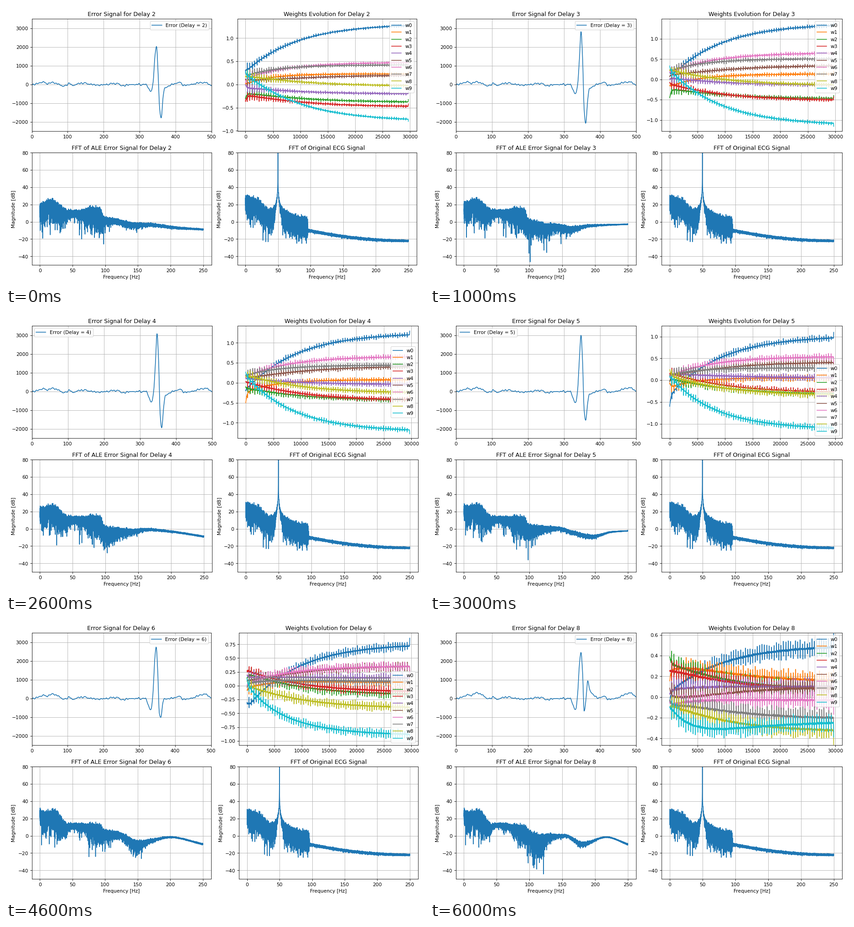
These frames come from a looping animation (917 px wide and 611 px high, 7000 ms). A matplotlib script:

```python
import matplotlib.pyplot as plt
import numpy as np
from matplotlib.animation import FuncAnimation

W, H = 917, 611
fig = plt.figure(figsize=(12, 8), dpi=76.417)

LENGTH = 29700
SAMPLES = np.arange(501)
STEPS = np.arange(0, LENGTH + 1, 10)
FREQS = np.linspace(0, 250, 15001)

rng = np.random.default_rng(4)
NOISE = (rng.normal(size=FREQS.size) + 1j * rng.normal(size=FREQS.size)) / 2 ** 0.5
BEATS = 347 + 431 * np.arange(68) + rng.uniform(-25, 25, 68)
WIGGLE = sum(rng.uniform(8, 18) * np.sin(2 * np.pi * SAMPLES / p + rng.uniform(0, 6))
             for p in np.geomspace(7, 24, 6))

# Rows belong to delays 2, 4, 6 and 8; other delays follow a cubic between them.
QRS_X = [318, 333, 338, 343, 347.5, 351.5, 356, 360.5, 366, 371, 392]
QRS_Y = [[-350, 150, 1500, 2050, 700, -1300, -1780, -600, -200],
         [-550, 0, 1500, 3130, 1800, -1200, -1940, -800, -230],
         [-590, 200, 2000, 2770, 1500, -800, -1000, -220, -30],
         [-580, 250, 1800, 2480, 1500, -690, -150, 950, 480]]
FIRST = [[.33, .03, -.2, -.24, -.08, .1, .15, .2, .17, .17],
         [-.1, -.2, -.15, 0, .1, .13, .18, .2, .17, .1],
         [-.33, -.03, .2, .25, .15, .1, .05, .05, -.02, -.05],
         [.07, .27, .31, .25, .07, 0, -.07, -.08, -.09, -.13]]
LAST = [[1.27, .225, -.375, -.47, -.2, .195, .47, .42, -.025, -.75],
        [1.2, .075, -.43, -.42, -.04, .4, .65, .44, -.24, -1.18],
        [.72, .06, -.15, -.1, .14, .35, .35, .08, -.39, -.88],
        [.48, .16, .08, .08, .1, .09, -.03, -.2, -.32, -.25]]
BEND = [-.01, .045, .02, .02, .01, -.03, .015, .03, .02, .04]

# Limits of the weights, legend places, and the spectrum above the pass band.
SCENES = [
    (-1.007, 1.414, "upper right", "upper right",
     [(97, 1.5), (112, 1), (145, -4), (165, -3.3), (210, -7), (250, -8.8)]),
    (-1.275, 1.49, "upper right", "upper right",
     [(97, -5), (110, -5.5), (125, -8.3), (140, -6.2), (162, -8.6), (190, -4.6),
      (250, -2.8)]),
    (-1.385, 1.423, "upper left", "center right",
     [(98, -6), (120, -4), (140, -3.4), (163, -.8), (200, -3.2), (250, -8.9)]),
    (-1.33, 1.247, "upper left", "lower right",
     [(97, -1.5), (143, .3), (165, -4.2), (196, -9), (225, -3.7), (250, -2.3)]),
    (-1.076, .957, "upper right", "lower right",
     [(97, 2), (120, 1), (150, -10.5), (165, -7), (200, -1.6), (250, -9.6)]),
    (-.744, .706, "upper right", "upper right",
     [(100, 3), (115, 0), (131, -12.5), (145, -4), (175, -.3), (211, -9.5),
      (250, -2)]),
    (-.465, .62, "upper right", "upper right",
     [(95, 2), (114, -12), (128, -2), (155, 0), (180, -9.5), (217, -1.5),
      (250, -9.8)]),
]


def across(table, delay):
    coef = np.polyfit([2, 4, 6, 8], np.array(table, float), 3)
    return delay ** np.arange(4)[::-1] @ coef


def smooth(x, pts):
    """Monotone cubic curve through (x, y) points."""
    xs, ys = np.array(pts, float).T
    x = np.clip(x, xs[0], xs[-1])
    h = np.diff(xs)
    s = np.diff(ys) / h
    a, b = s[:-1], s[1:]
    same = a * b > 0
    inner = np.zeros(len(a))
    inner[same] = 2 * a[same] * b[same] / (a[same] + b[same])
    m = np.concatenate(([s[0]], inner, [s[-1]]))
    i = np.clip(np.searchsorted(xs, x, "right") - 1, 0, len(h) - 1)
    u = (x - xs[i]) / h[i]
    v = 1 - u
    return (ys[i] * (1 + 2 * u) * v * v + ys[i + 1] * u * u * (3 - 2 * u)
            + h[i] * u * v * (m[i] * v - m[i + 1] * u))


def amp(db):
    return 10 ** (db / 20)


def decibel(z):
    return 20 * np.log10(np.abs(z))


def bump(x, mid, width):
    return np.exp(-((x - mid) / width) ** 2)


BASELINE = WIGGLE + smooth(SAMPLES, [
    (0, -40), (33, 110), (45, 40), (58, 100), (90, -90), (105, 40), (115, -50),
    (138, 70), (185, -40), (238, 50), (250, -70), (280, -10), (390, 0), (410, 100),
    (425, -50), (478, 100), (500, -40)])


def error_signal(delay):
    waves = 33 * (delay - 2) * (bump(SAMPLES, 62, 28) + bump(SAMPLES, 486, 24))
    beat = np.concatenate(([0], across(QRS_Y, delay), [0]))
    return BASELINE + waves + smooth(SAMPLES, list(zip(QRS_X, beat)))


def error_spectrum(delay, tail):
    k = delay - 2
    g = min(k, 4)
    base = [(0, 8), (35, 8), (50, 10 + k * 0.4), (65, 9 + k * 0.4), (80, 6), (92, 3)]
    noise = [(0, 14 + 3.2 * g), (3, 15 + 1.8 * g), (15, 19 + 0.8 * g),
             (24, 16.5 + 1.7 * g), (34, 10 + 0.8 * g), (45, 3 - abs(k - 2)),
             (62, 2 - abs(k - 2) / 2), (70, 6 - k), (81, 10 - k), (92, 9 - 0.8 * k),
             (98, 0.6 * k - 5), (115, 0.9 * k - 11), (150, -17), (250, -34)]
    return decibel(amp(smooth(FREQS, base + tail)) + NOISE * amp(smooth(FREQS, noise)))


def ecg_spectrum():
    off = np.abs(FREQS - 49.8)
    hum = 40 / (off + 0.001) * np.exp(-off / 8)
    base = 12 * np.clip((250 - FREQS) / 153, 0, 1) ** 2 - 22
    noise = smooth(FREQS, [(0, 25), (10, 22), (20, 19), (38, 8), (55, 8), (72, 2),
                           (95, -2), (96.5, -28), (250, -45)])
    return decibel(hum + amp(base) + NOISE * amp(noise))


def weight_tracks(delay):
    """Staircase learning curves with a two-sided spike on every heartbeat."""
    local = np.random.default_rng(delay)
    k = delay - 2
    spike = min(0.03 + 0.016 * k, 0.085)
    size = spike + (0.1 - 0.013 * k) * np.exp(-STEPS / 4000)
    beat = BEATS[np.clip(np.searchsorted(BEATS, STEPS) - 1, 0, None)]
    held = np.where(STEPS > BEATS[0], 0.6 * beat + 0.4 * STEPS, STEPS)
    q = (1 - np.exp(-held / 9000) - 0.043) / 0.92
    tracks = []
    for i, (a, b) in enumerate(zip(across(FIRST, delay), across(LAST, delay))):
        bend = BEND[i] - (0.025 * k if i == 9 else 0)
        start = local.normal(0, 0.06) - (0.22 if i == 5 - delay else 0)
        track = a + (b - a) * q + 4 * bend * q * (1 - q) + start * np.exp(-STEPS / 250)
        sign = (-1) ** i
        pulse = local.normal(0, 0.05, STEPS.size)
        for t in BEATS:
            up, down = sign * local.uniform(0.55, 1.15, 2)
            pulse += up * bump(STEPS, t, 16) - down * bump(STEPS, t + 36, 16)
        final = bump(STEPS, LENGTH, 16) * (1.6 if i < 5 else -1.6)
        tracks.append(track + size * pulse + spike * final)
    return tracks


ECG = ecg_spectrum()
DATA = [(error_signal(d), weight_tracks(d), error_spectrum(d, scene[-1]))
        for d, scene in enumerate(SCENES, 2)]


def panel(x0, x1, top, title):
    height = 245.7
    ax = fig.add_axes([x0 / W, (H - top - height) / H, (x1 - x0) / W, height / H])
    ax.set_title(title)
    ax.grid(True)
    return ax


def spectrum_panel(x0, x1, title, values):
    ax = panel(x0, x1, 321.5, title)
    ax.plot(FREQS, values)
    ax.set_ylim(-50, 80)
    ax.set_xlabel("Frequency [Hz]")
    ax.set_ylabel("Magnitude [dB]")


def draw(index):
    fig.clear()
    delay = index + 2
    low, high, error_loc, weight_loc, _ = SCENES[index]
    error, tracks, spectrum = DATA[index]
    left, left_end, right, right_end = 56.5, 452, 508, 903.5
    if delay == 2:
        left_end, right, right_end = 450.5, 507.5, 900.5
    elif delay == 6:
        left_end, right = 449.5, 511

    ax = panel(left, left_end, 28.5, f"Error Signal for Delay {delay}")
    ax.plot(SAMPLES, error, label=f"Error (Delay = {delay})")
    ax.set_xlim(0, 500)
    ax.set_ylim(-2500, 3500)
    ax.legend(loc=error_loc)

    ax = panel(right, right_end, 28.5, f"Weights Evolution for Delay {delay}")
    for i, track in enumerate(tracks):
        ax.plot(STEPS, track, label=f"w{i}")
    ax.set_ylim(low, high)
    ax.legend(loc=weight_loc)

    spectrum_panel(left, left_end, f"FFT of ALE Error Signal for Delay {delay}",
                   spectrum)
    spectrum_panel(right, right_end, "FFT of Original ECG Signal", ECG)
    return []


anim = FuncAnimation(fig, draw, frames=len(SCENES), interval=1000, repeat=True)
plt.show()
```
